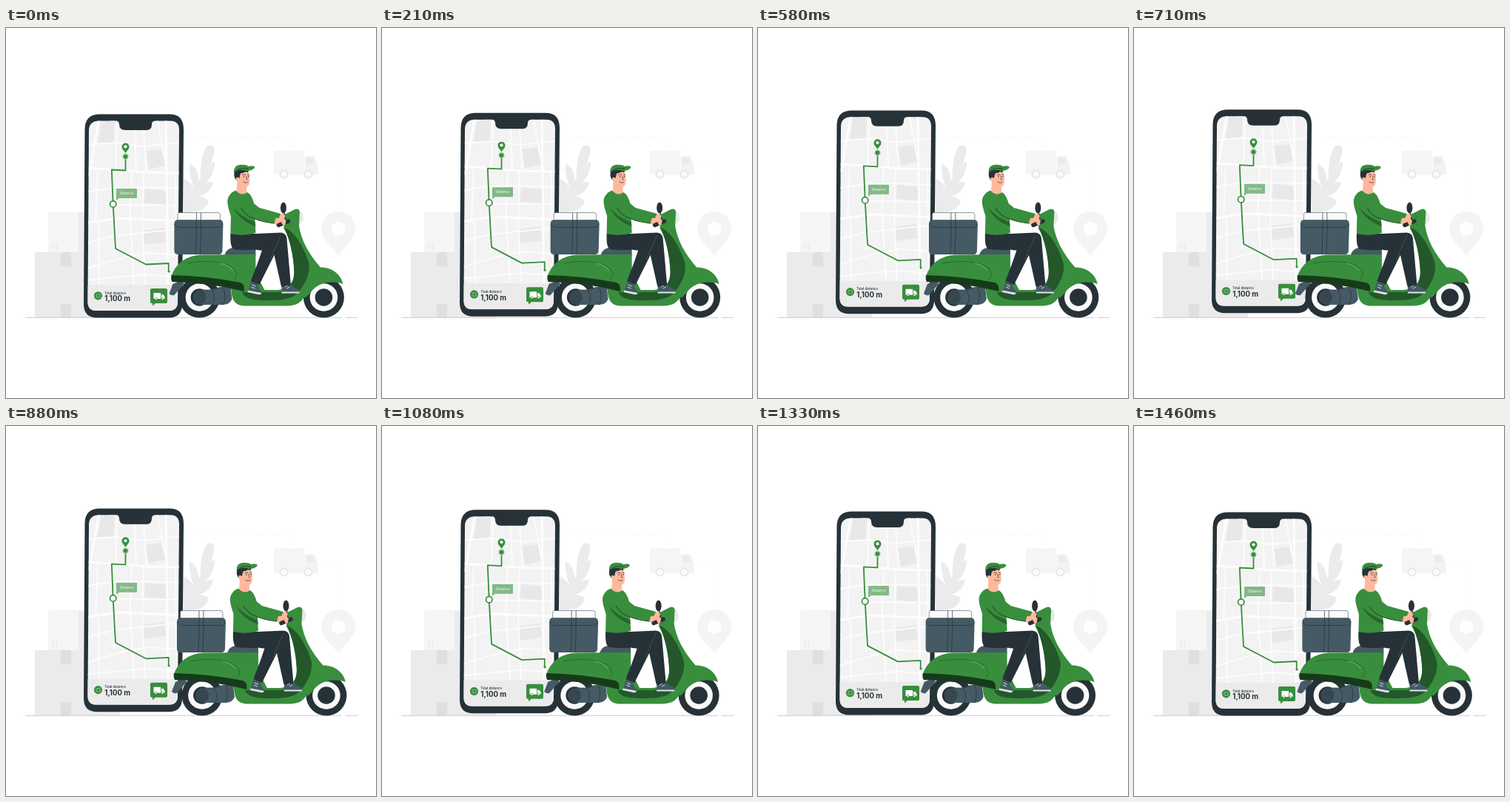
Recreate the animation shown at these times as an HTML page. Size 500x500 px, loop 1500 ms.

```html
<!DOCTYPE html>
<html lang="en">
<head>
<meta charset="utf-8">
<title>Delivery on the way</title>
<style>
html, body { margin: 0; width: 100%; height: 100%; overflow: hidden; background: #fff; }
svg { display: block; width: 100vw; height: 100vh; }
text { font-family: Inter, "Open Sans", sans-serif; }
.green { fill: #388e3c; }
.deep { fill: #24572a; }
.dark { fill: #263238; }
.slate { fill: #455a64; }
.skin { fill: #ffb89c; }
.ink { fill: none; stroke: #263238; stroke-width: .7; stroke-linecap: round; stroke-linejoin: round; }
</style>
</head>
<body>
<svg viewBox="0 0 500 500">
  <defs>
    <clipPath id="screen">
      <path d="M126 125.500H148Q153 125.500 153 130Q153 138 161 138H190Q197 138 197 130Q197 125.500 202 125.500H222Q234 125.500 234 138L232 370Q232 382 220 382H122Q110.500 382 110.500 370L112 139Q112 125.500 126 125.500Z"/>
    </clipPath>
  </defs>
  <rect width="500" height="500" fill="#fff"/>

  <g id="backdrop">
    <path d="M240 147H390V165M424 183H449V247" fill="none" stroke="#f5f5f5" stroke-width=".9" stroke-dasharray="4 3"/>
    <path d="M57 249H112V303H57Z" fill="#f5f5f5"/>
    <path d="M98 249H108V303H98ZM63 291H65V300H63ZM67 291H69V300H67Z" fill="#ececec"/>
    <path d="M39 303H154V391H39Z" fill="#ebebeb"/>
    <path d="M74 303H88V322H74ZM74 373H88V391H74Z" fill="#dfdfdf"/>
    <path d="M26 391.300H454M459 391.300H475" stroke="#bdbdbd" stroke-width=".8"/>
    <path fill="#ebebeb" d="M263 204C262 192 264 172 270 162C273 157 281 157 281.500 163C281 176 275 189 268 198
      C272 188 277 182 282 180.500C282 194 276 206 265 213C269 209 275 207 280 208C278 219 270 226 259 228
      C266 228 271 230 274 233C272 243 262 249 250 249H240V204C245 205 251 210 254 217
      C250 206 247 194 248 183C255 186 260 194 260 205Z"/>
    <g>
      <path d="M362 165.500H402.500V197H362Z" fill="#f5f5f5"/>
      <path d="M403.500 173H415Q417 173 418 176L421.500 186V197H403.500Z" fill="#f3f3f3"/>
      <path d="M406 175H414L418 184H406Z" fill="#ebebeb"/>
      <path d="M362 198H423" stroke="#f0f0f0" stroke-width="1.200"/>
      <g fill="#fafafa" stroke="#e6e6e6" stroke-width="2">
        <circle cx="375.500" cy="197.500" r="5"/><circle cx="408.500" cy="197.500" r="5"/>
      </g>
    </g>
    <path d="M449 307C441 297 426 284 426 270.500A23 22.500 0 0 1 472 270.500C472 284 457 297 449 307ZM449 262A9.500 9.500 0 1 0 449 281A9.500 9.500 0 1 0 449 262Z" fill="#f4f4f4"/>
  </g>

  <g id="phone">
    <path class="dark" d="M127 116.600H221Q240 116.600 240 137L238 373Q238 391.500 220 391.500H123Q105 391.500 105 373L106.500 137Q106.500 116.600 127 116.600Z"/>
    <g clip-path="url(#screen)">
      <rect x="108" y="122" width="130" height="264" fill="#f3f3f3"/>
      <path fill="#e8e8e8" d="M128 128L147 124L145 154L124 156ZM189 166L210 163L215 186L193 191ZM188 217L217 220V239L187 236ZM184 274L214 270L216 289L187 293Z"/>
      <g id="roads" fill="none" stroke="#fdfdfd" stroke-width="1.800">
        <path stroke-width="3" d="M106 189L142 191L190 195L240 196M216 122L219 347M126 122L112 200M106 264L150 257L240 261"/>
        <path d="M106 158L148 155L186 160L240 154M150 122L148 190M174 138L176 193M186 138L190 195M204 122L212 163L217 190M106 222L143 216L186 215L240 217M186 195L184 262M170 193L167 261M124 192L121 264M144 239L240 240"/>
        <path d="M106 326L155 311L190 304L240 307M184 261L188 347M149 257L146 306M125 263L126 347M106 291L146 281L240 271M168 260L173 347M106 341L188 333L240 337M229 196L231 347"/>
      </g>
      <rect x="108" y="347" width="130" height="40" fill="#ebebeb"/>
    </g>

    <path d="M161.500 174V192.500L142.800 191.500L144.700 238L148 298L189 319.500L219.700 318V328" fill="none" stroke="#388e3c" stroke-width="1.800" stroke-linejoin="round"/>
    <circle class="green" cx="220" cy="329" r="1.600"/>
    <circle cx="161.500" cy="173.800" r="4.200" fill="#a5cda7"/>
    <circle class="green" cx="161.500" cy="173.800" r="2.800"/>
    <path class="green" d="M161.500 169C159.500 166 156.500 163.500 156.500 160.500A5 5 0 0 1 166.500 160.500C166.500 163.500 163.500 166 161.500 169Z"/>
    <circle cx="161.500" cy="160.300" r="2.100" fill="#fff"/>
    <circle cx="144.700" cy="238" r="4.200" fill="#fff" stroke="#388e3c" stroke-width="1.700"/>
    <path d="M149.500 217H176Q177 217 177 218V229Q177 230 176 230H153L149 233V218Q149 217 149.500 217Z" fill="#83b986"/>
    <text x="163.200" y="225" text-anchor="middle" font-size="4.500" fill="#fff">Distance</text>

    <circle class="green" cx="124.500" cy="361.800" r="5.600"/>
    <path d="M122 360H127.200V364H122Z" fill="none" stroke="#b9d9bb" stroke-width=".6"/>
    <text x="133.300" y="359.500" font-size="4.300" font-weight="500" fill="#263238">Total distance</text>
    <text x="133.300" y="369.400" font-size="9.700" font-weight="700" fill="#263238">1,100 m</text>
    <path class="green" d="M197 352H216Q218 352 218 354V370Q218 372 216 372H202L198 375.500V372H197Q195 372 195 370V354Q195 352 197 352Z"/>
    <path d="M199.500 358H209V366H199.500ZM209.800 360H212.500L214.500 363V366H209.800Z" fill="#fff"/>
    <g fill="#fff" stroke="#388e3c" stroke-width=".7"><circle cx="202.700" cy="366" r="1.500"/><circle cx="211.500" cy="366" r="1.500"/></g>
  </g>

  <g id="rider"><g transform="translate(-.6 0)">
    <g id="wheels"></g>

    <path class="slate" d="M235 342L226 346L221 359Q224 362 228 361L242 345Z"/>
    <path class="slate" d="M260 354H276L290 350H304L306 366Q304 373 294 374L262 374Z"/>
    <ellipse cx="262" cy="364" rx="9" ry="10" fill="#37474f"/>
    <path class="ink" d="M262 354H277Q283 354 288 351M279 355Q285 364 280 374M294 351Q299 362 294 374" stroke-width=".5"/>

    <ellipse cx="394.500" cy="256" rx="8" ry="10" fill="#e3ebe3"/>
    <path class="green" d="M403 357C404 337 412 324 426 323.500C442 323.500 453 333 456 346C444 342 431 343 421 349C412 355 410 362 404 365Z"/>
    <path class="green" d="M297 343L340 335L350 354H365C382 354 390 344 390 330C390 308 384 284 376 271L377 252L391 245Q397 243 397.500 249L396.500 267C399 285 409 305 426 324C418 334 411 345 406 358C401 371 393 375.500 380 375.500H324C311 375.500 306 369 305 354Z"/>
    <path class="deep" d="M377 270C390 274 404 297 409.500 317C413 331 403 352 390 362C382 367 370 368 352 368C332 368 323 365 320 357H368C383 356 390 345 390 329C389 307 384 286 377 270Z"/>

    <path class="slate" d="M296 307C298 299 304 296.500 312 296.500L338 299V308H296Z"/>
    <path class="green" d="M224 336C229 319 244 307 265 306.500L338 306V337C337 350 331 355 322 354Z"/>
    <path d="M224 334Q272 335 317 344Q323 345 322.500 356Q274 344 225 343Q223 339 224 334Z" fill="#183a1c"/>
    <path d="M246 318C270 313 303 315 311 328Q315 336 308 341" fill="none" stroke="#246329" stroke-width=".8"/>
    <path d="M290 318Q302 320 307 328" fill="none" stroke="#87bb89" stroke-width=".8"/>

    <path d="M235 249.500H287Q290 249.500 290 252V260H232.500V252Q232.500 249.500 235 249.500Z" fill="#fafafa" stroke="#455a64" stroke-width=".6"/>
    <path class="ink" d="M258 250V259M264 250V259" stroke-width=".5"/>
    <path class="slate" d="M232 259.300H290Q294 260 294 265L293 301Q293 306 288 306H233Q228 306 228 301V265Q228 260 232 259.300Z"/>
    <path class="ink" d="M228.500 265Q231 269.500 236 269.500H287Q292 269.500 293.500 265M258 260V278L257 305.500M264 260V278L263 305.500"/>

    <!-- far leg, then near leg -->
    <path class="slate" d="M373 348L386 347Q390 351 397 354Q398 357 396 358H373Z"/>
    <path d="M373 356.500H397V358.500H373Z" fill="#dfe5e8"/>
    <path class="dark" d="M338 278L372 276.500Q379 277 380 284L385.500 347Q379 351 372.500 349L362 302L340 300Z"/>
    <path class="slate" d="M332 342L341 346Q341 352 347 357Q346 360 342 359.500L327.500 356Z"/>
    <path d="M327.500 354.500L346 358Q345 361 341 360L327 357Z" fill="#dfe5e8"/>
    <path class="dark" d="M304 278H341L368 279Q375 283 371 291Q357 319 343 347L331.500 342C337 327 342 315 347 299Q326 301 309 299Q303 297 304 278Z"/>
    <path d="M372 280Q369 288 362 302L358 313" fill="none" stroke="#52616a" stroke-width=".6"/>
    <path d="M333 347L338 349M332 350L337 352M377 350L381 348M380 352L384 350" stroke="#fff" stroke-width=".8"/>

    <!-- mirror and handlebar -->
    <path d="M376 248L379 263" stroke="#263238" stroke-width="1.500"/>
    <ellipse class="dark" cx="375.500" cy="243" rx="4" ry="7.500"/>
    <path class="skin" d="M366 256L375 250L378 254L376 260L368 262Z"/>

    <!-- torso and arms -->
    <path class="skin" d="M313 207L326 210V224Q319 229 312 221Z"/>
    <path class="green" d="M311 219.500Q319 228 327 222Q333 226 336 238L338 277Q321 282 304 278L304.500 254Q299 238 300 232Q302 223 311 219.500Z"/>
    <path class="deep" d="M308 243Q318 254 331 260L337 262L338 268Q317 261 308 243Z" opacity=".75"/>
    <path class="green" d="M318 229Q327 225 333 235L343 243L372 251L366 264Q346 263 330 255Q318 246 318 229Z"/>
    <path d="M318 243Q324 254 337 258Q350 263 365 264" fill="none" stroke="#24572a" stroke-width="1.300"/>
    <path class="skin" d="M365 257Q372 256 377 259Q381 263 376 266L368 267L363 264Z"/>
    <path d="M369 266.500L382 261" stroke="#263238" stroke-width="5.500" stroke-linecap="round"/>
    <path class="skin" d="M371 258Q377 257 379 260L378 266L375 267L373 263Z"/>

    <!-- head -->
    <path class="skin" d="M313 193H328Q331 202 329.500 211Q327 216 321 214Q312 211 312 203Z"/>
    <path class="dark" d="M309 192L328 191Q329 193 327.500 195Q324 193 321 196Q318 195 317 198L316 203Q314 201 313 206Q308 204 309 194Z"/>
    <circle class="skin" cx="313.500" cy="204" r="2.300"/>
    <path class="green" d="M309 194.500Q308 186 317 184.800Q325 184 328 187Q335 185 337 188Q335 193 325 193Q317 190 309 194.500Z"/>
    <path d="M312 192.500Q319 188 328 190.500" fill="none" stroke="#24572a" stroke-width="1.300"/>
    <path class="ink" d="M320 198.500Q322 197 324 198.500M327 198L329 198.500M325 200L326.500 204.500L325 205M321 208Q324 210.500 327 208.500"/>
    <circle class="dark" cx="322" cy="201" r=".8"/><circle class="dark" cx="328" cy="200.700" r=".8"/>
  </g></g>
</svg>
<script>
const $ = id => document.getElementById(id);
const LOOP = 1500, FPS = 24, LAST = LOOP * FPS / 1000 - 1;
const LIFT = 6.5, SWAY = 0.88;
// horizontal shake, one value per tenth of the loop
const SHAKE = [0, -1, 2, -4, 4, -4, 4, -4, 2, -1, 0];

const wheel = x => [[27.5, '#263238'], [18.8, '#fafafa'], [11.8, '#263238']]
  .map(([r, fill]) => `<circle cx="${x}" cy="364" r="${r}" fill="${fill}"/>`).join('');
$('wheels').innerHTML = wheel(262) + wheel(430);

function shakeAt(p) {
  const k = Math.min(9, Math.floor(p * 10));
  return SWAY * (SHAKE[k] + (SHAKE[k + 1] - SHAKE[k]) * (p * 10 - k));
}

function draw(ms) {
  const step = Math.min(LAST, Math.floor((ms % LOOP) * FPS / 1000 + 0.13));
  const p = step / LAST;
  const lift = LIFT * (1 - Math.abs(2 * p - 1));
  $('phone').setAttribute('transform', `translate(0 ${-lift})`);
  $('rider').setAttribute('transform', `translate(${shakeAt(p)} 0)`);
}

const start = performance.now();
function tick() {
  draw(performance.now() - start);
  requestAnimationFrame(tick);
}
tick();
</script>
</body>
</html>
```
